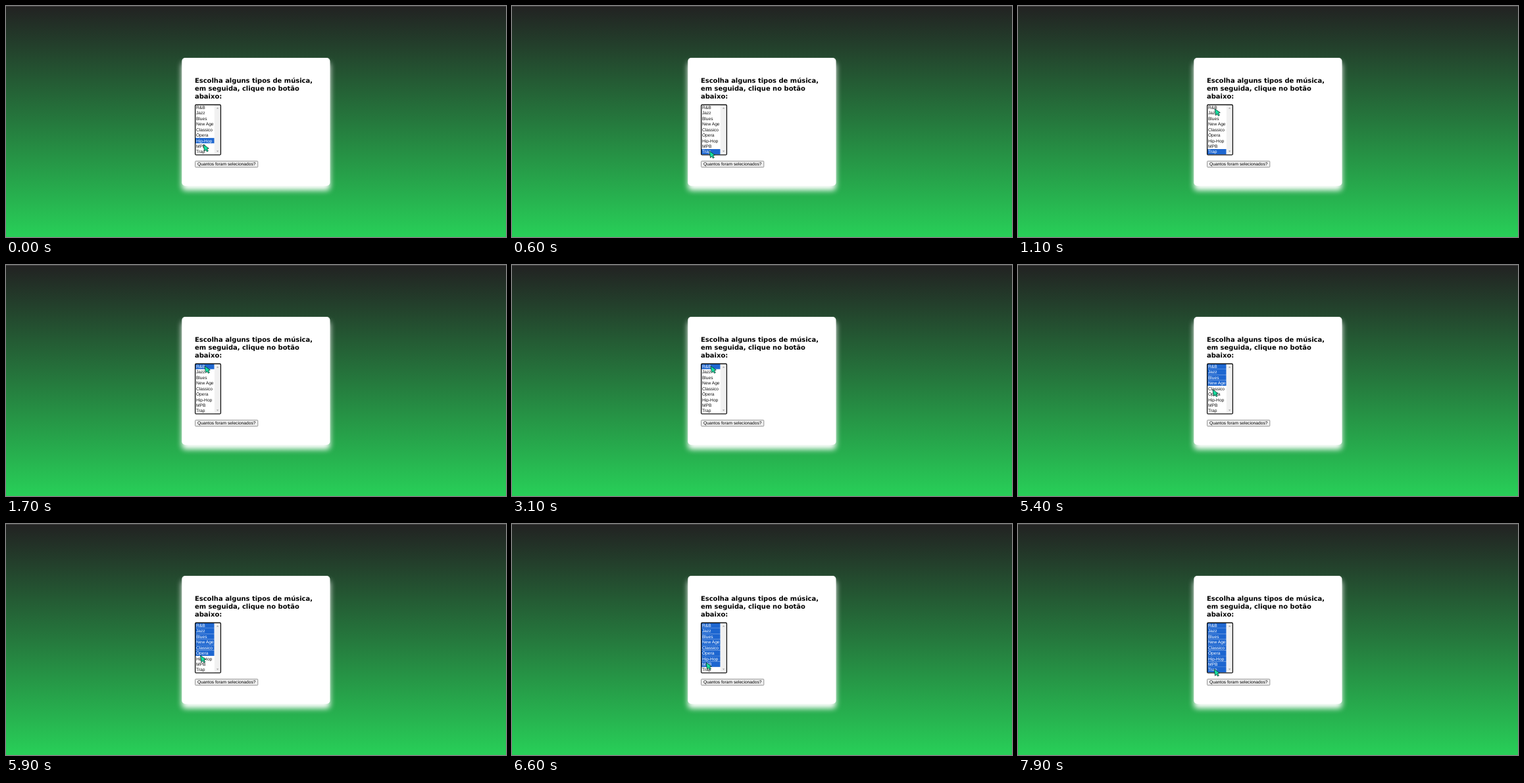
Recreate the animation shown at these times as an HTML page. Size 760 by 352 pixels, loop 8000 ms.

```html
<!DOCTYPE html>
<html lang="pt">
<head>
<meta charset="utf-8">
<style>
  html, body { margin: 0; height: 100%; overflow: hidden; }
  svg { display: block; width: 100%; height: 100%; }
  text { font: 6.67px "Liberation Sans", Arial, sans-serif; text-rendering: geometricPrecision; }
  .title { font: bold 9.96px "DejaVu Sans", Verdana, sans-serif; }
  .glow { filter: drop-shadow(0 7px 4.5px #fff); }
</style>
</head>
<body>
<svg viewBox="0 0 760 352" preserveAspectRatio="none">
  <defs>
    <linearGradient id="bg" x2="0" y2="1">
      <stop stop-color="#222"/>
      <stop offset="1" stop-color="#28cf58"/>
    </linearGradient>
    <clipPath id="inner"><rect x="288" y="151" width="38" height="75.6"/></clipPath>
  </defs>
  <rect width="760" height="352" fill="url(#bg)"/>
  <rect width="760" height="1" fill="#444"/>
  <rect class="glow" x="267.3" y="79" width="225.2" height="195" rx="5" fill="#fff"/>

  <text class="title" y="116.6">
    <tspan x="287">Escolha alguns tipos de música,</tspan>
    <tspan x="287" dy="12">em seguida, clique no botão</tspan>
    <tspan x="287" dy="12">abaixo:</tspan>
  </text>

  <g clip-path="url(#inner)">
    <g id="rows"></g>
    <rect x="316.8" y="150" width="10" height="78" fill="#f1f1f1"/>
    <path d="M319.8 156.5l1.8-2 1.8 2zM319.8 220.5l1.8 2 1.8-2z" fill="#a3a3a3"/>
  </g>
  <rect x="287.6" y="150.5" width="38.8" height="76.4" rx="1.5" fill="none" stroke="#101010" stroke-width="1.3"/>

  <rect x="287.6" y="236.3" width="95.2" height="9.4" rx="1" fill="#efefef" stroke="#6b6b6b" stroke-width=".7"/>
  <text x="291" y="243.3">Quantos foram selecionados?</text>

  <path id="cursor" d="M0 0L8.3 6 5.4 6.8 7.4 9.9 5.5 11 3.6 8 1.6 10.4Z"
    fill="#16dfa0" stroke="#10302a" stroke-width=".8" stroke-linejoin="round"/>
</svg>
<script>
const LOOP = 8000, STEP = 100, PITCH = 8.44;
const genres = ['R&B', 'Jazz', 'Blues', 'New Age', 'Classico', 'Ópera', 'Hip-Hop', 'MPB', 'Trap'];
const LAST = genres.length - 1;

// Pointer moves; it rests in between.
const moves = [
  { from: 0, to: 400, x: 300, y: 221 },
  { from: 600, to: 1000, x: 298, y: 160 },
  { from: 1000, to: 1400, x: 302, y: 146 },
  { from: 1500, to: 1700, x: 302, y: 154 },
  { from: 3600, to: 3900, x: 297, y: 162 },
  { from: 4100, to: 6400, x: 295, y: 211 },
  { from: 6800, to: 7000, x: 296, y: 221 },
  { from: 7500, to: 7900, x: 298, y: 221 }
];

const clamp = (v, lo, hi) => Math.min(hi, Math.max(lo, v));

const add = (tag, attrs) => {
  const el = document.createElementNS('http://www.w3.org/2000/svg', tag);
  for (const key in attrs) el.setAttribute(key, attrs[key]);
  return document.getElementById('rows').appendChild(el);
};

const rows = genres.map((name, i) => {
  const y = 150.5 + i * PITCH;
  const bar = add('rect', { x: 288, y, width: 28.6, height: PITCH - .2 });
  const label = add('text', { x: 288.9, y: y + 6.4 });
  label.textContent = name;
  return { bar, label };
});

const cursor = document.getElementById('cursor');

function pointerAt(t) {
  let x = 300, y = 211;
  for (const m of moves) {
    const k = clamp((t - m.from) / (m.to - m.from), 0, 1);
    x += (m.x - x) * k;
    y += (m.y - y) * k;
  }
  return [x, y];
}

// First and last selected row: a single row slides down, then a range grows from the top.
function selectionAt(t) {
  if (t < 1600) {
    const row = Math.min(LAST, 6 + Math.floor(t / 200));
    return [row, row];
  }
  if (t < 3800) return [0, 0];
  return [0, clamp(1 + Math.floor((t - 4300) / 380), 1, LAST)];
}

function draw(now) {
  const t = Math.floor(now % LOOP / STEP) * STEP;
  const [first, last] = selectionAt(t);
  rows.forEach(({ bar, label }, i) => {
    const on = i >= first && i <= last;
    bar.setAttribute('fill', on ? '#1d66d0' : '#fff');
    label.setAttribute('fill', on ? '#fff' : '#111');
  });
  cursor.setAttribute('transform', `translate(${pointerAt(t)})`);
}

const start = performance.now();
function tick() {
  draw(performance.now() - start);
  requestAnimationFrame(tick);
}
tick();
</script>
</body>
</html>
```
